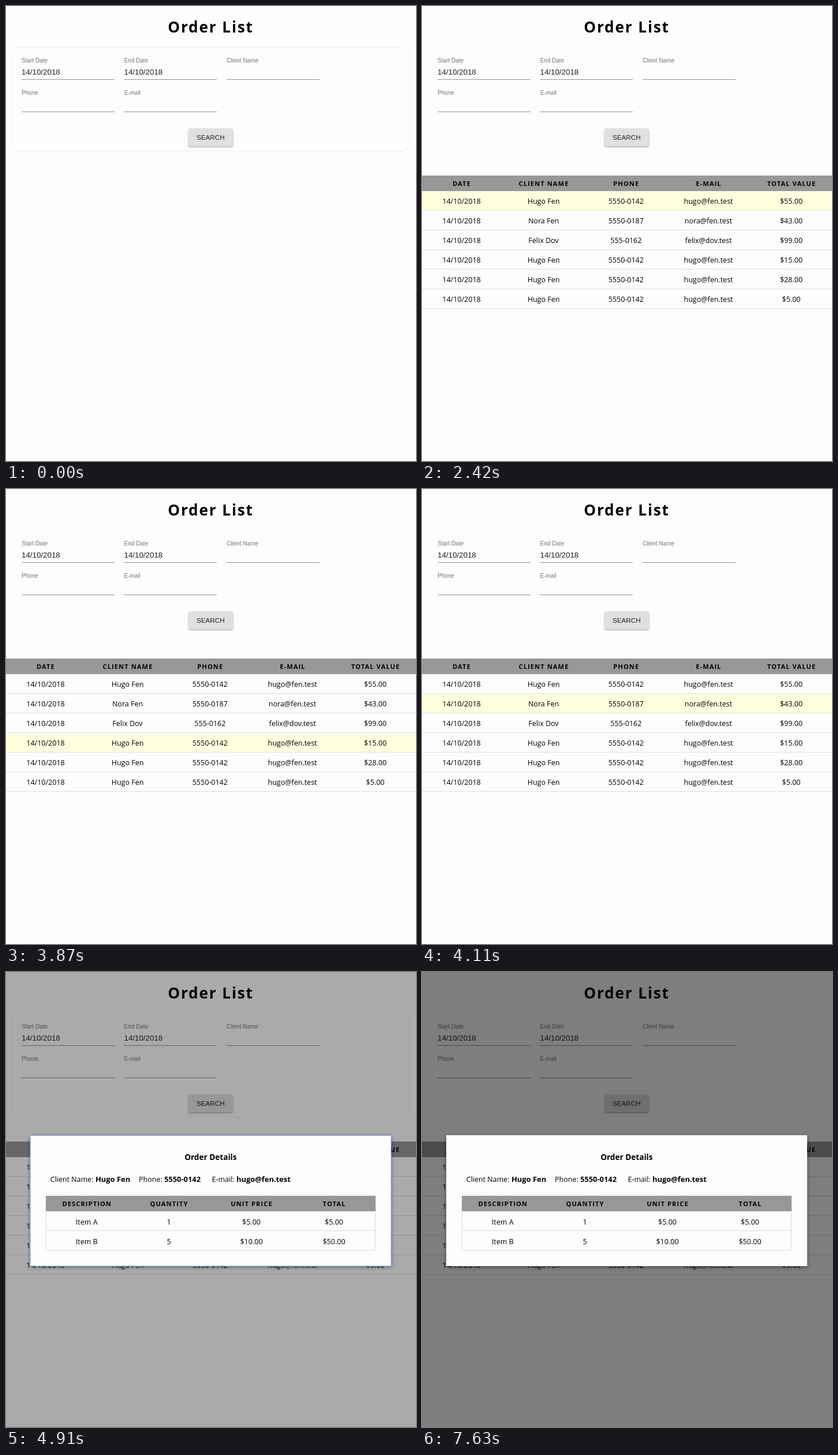
An HTML page for the animation above (7730 ms loop, 710x789 px).

```html
<!DOCTYPE html>
<html lang="en">
<head>
<meta charset="utf-8">
<title>Order List</title>
<style>
  html, body { margin: 0; width: 100%; height: 100%; overflow: hidden; background: #fdfdfd; }
  svg { display: block; width: 100vw; height: 100vh; }
  text { font: 12.5px "Open Sans", "Noto Sans", sans-serif; fill: #000; white-space: pre; }
  .mid { text-anchor: middle; }
  .title { font-size: 26.2px; font-weight: 700; letter-spacing: 1.85px; }
  .th { font-size: 11.1px; font-weight: 700; letter-spacing: 1.1px; }
  .h3 { font-size: 13.6px; font-weight: 700; }
  .strong { font-size: 12.9px; font-weight: 700; }
  .label, .value, .caps { font-family: "Liberation Sans", Arial, sans-serif; }
  .label { font-size: 10px; fill: #757575; }
  .value { font-size: 13.33px; fill: #212121; }
  .caps { font-size: 11.67px; fill: #212121; }
  #modalBox { filter: drop-shadow(0 2px 3px rgba(0, 0, 0, .4)); }
</style>
</head>
<body>
<svg id="stage" viewBox="0 0 710 789" preserveAspectRatio="none">
  <defs>
    <clipPath id="buttonClip"><rect x="316" y="212.5" width="77" height="31" rx="3"/></clipPath>
  </defs>
  <rect width="710" height="789" fill="#fdfdfd"/>
  <g id="form"></g>
  <g id="button">
    <rect id="face" x="316" y="212.5" width="77" height="31" rx="3"/>
    <g clip-path="url(#buttonClip)"><circle id="ripple" cx="347" cy="228"/></g>
  </g>
  <g id="orders"></g>
  <rect id="shade" width="710" height="789"/>
  <g id="modal"></g>
</svg>
<script>
const LOOP = 7730;
const $ = id => document.getElementById(id);

function add(parent, tag, attrs, content) {
  const el = document.createElementNS("http://www.w3.org/2000/svg", tag);
  for (const key in attrs) el.setAttribute(key, attrs[key]);
  if (content) el.textContent = content;
  parent.appendChild(el);
  return el;
}
const rect = (parent, x, y, width, height, fill, more) =>
  add(parent, "rect", { x, y, width, height, fill, ...more });
const text = (parent, x, y, content, cls = "") =>
  add(parent, "text", { x, y, class: cls }, content);

function row(parent, centers, y, cells, header) {
  cells.forEach((cell, i) =>
    text(parent, centers[i] + (header ? .5 : 0), y, cell, header ? "mid th" : "mid"));
}

// Search form
const form = $("form");
const card = rect(form, 9.5, 71.5, 689, 180, "none", { rx: 14, stroke: "#eeeeee" });
text(form, 354.5, 46, "Order List", "mid title");
[
  [27, 98, "Start Date", "14/10/2018"],
  [204.5, 98, "End Date", "14/10/2018"],
  [382, 98, "Client Name", ""],
  [27, 154, "Phone", ""],
  [204.5, 154, "E-mail", ""]
].forEach(([x, y, label, value]) => {
  text(form, x, y - .5, label, "label");
  if (value) text(form, x, y + 21, value, "value");
  rect(form, Math.floor(x), y + 29, 161, 1, "#949494");
});
text($("button"), 354.3, 232, "SEARCH", "mid caps");

// Order table
const people = {
  hugo: ["Hugo Fen", "5550-0142", "hugo@fen.test"],
  nora: ["Nora Fen", "5550-0187", "nora@fen.test"],
  felix: ["Felix Dov", "555-0162", "felix@dov.test"]
};
const sales = [["hugo", 55], ["nora", 43], ["felix", 99], ["hugo", 15], ["hugo", 28], ["hugo", 5]];
const money = n => "$" + n.toFixed(2);
const orders = $("orders");
const columns = [68.5, 210.5, 353.3, 496, 639.5];
rect(orders, 0, 294, 710, 27, "#989898");
row(orders, columns, 312, ["DATE", "CLIENT NAME", "PHONE", "E-MAIL", "TOTAL VALUE"], true);
const hover = rect(orders, 0, 321, 710, 33, "#ffffe0");
sales.forEach(([who, total], i) => {
  const y = 321 + 34 * i;
  rect(orders, 0, y + 33, 710, 1, "#dddddd");
  row(orders, columns, y + 22, ["14/10/2018", ...people[who], money(total)]);
});

// Order details
const modal = $("modal");
const box = rect(modal, 42, 283, 625, 227, "#fdfdfd", { id: "modalBox" });
const outline = rect(modal, 42, 283.5, 625, 226.5, "none", { stroke: "#6f9fe6", rx: 1 });
text(modal, 354.3, 325.5, "Order Details", "mid h3");
const [client, phone, email] = people.hugo;
[[76.5, "Client Name:", 155, client], [230, "Phone:", 274, phone], [356.5, "E-mail:", 399, email]]
  .forEach(([x, label, valueX, value]) => {
    text(modal, x, 363.5, label);
    text(modal, valueX, 363.5, value, "strong");
  });
const parts = [139.7, 282, 425, 568];
rect(modal, 69.5, 388.5, 570, 94.5, "none", { stroke: "#dddddd" });
rect(modal, 69, 388, 571, 27, "#989898");
rect(modal, 69, 448, 571, 1, "#dddddd");
row(modal, parts, 406, ["DESCRIPTION", "QUANTITY", "UNIT PRICE", "TOTAL"], true);
[["Item A", 1, 5], ["Item B", 5, 10]].forEach(([name, count, price], i) =>
  row(modal, parts, 437.5 + 34 * i, [name, String(count), money(price), money(count * price)]));

// Timing: [start, value]; the last step already begun applies
const hoverSteps = [[0, -1], [2420, 0], [2670, 1], [2920, 2], [3110, 3], [3170, 4], [3300, 5],
  [3670, 4], [3870, 3], [3920, 2], [4110, 1], [4360, 0], [4850, -1]];
const shadeSteps = [[0, 0], [4850, .015], [4910, .33], [4970, .46], [5030, .5]];
const stepAt = (steps, t) => steps.filter(([start]) => t >= start).pop()[1];

// cubic-bezier(.4, 0, .2, 1)
function ease(x) {
  let lo = 0, hi = 1, s = .5;
  for (let i = 0; i < 20; i++) {
    s = (lo + hi) / 2;
    const bx = 1.2 * s * (1 - s) ** 2 + .6 * s * s * (1 - s) + s ** 3;
    if (bx < x) lo = s; else hi = s;
  }
  return 3 * s * s * (1 - s) + s ** 3;
}
const progress = (t, start, length) => {
  const x = (t - start) / length;
  return x <= 0 ? 0 : x >= 1 ? 1 : ease(x);
};
const show = (el, on) => el.setAttribute("visibility", on ? "visible" : "hidden");

function draw(t) {
  const open = t >= 4850;
  show(card, t < 1550 || open && t < 5030);
  show(orders, t >= 1550);
  show(modal, open);
  show(outline, open && t < 7630);
  box.setAttribute("fill", t < 4910 ? "#f9f9f9" : "#fdfdfd");

  const index = stepAt(hoverSteps, t);
  hover.setAttribute("y", 321 + 34 * Math.max(index, 0));
  hover.setAttribute("opacity", index < 0 ? 0 : 1);
  $("shade").setAttribute("opacity", stepAt(shadeSteps, t));

  const over = progress(t, 1190, 250) - progress(t, 2180, 240);
  const grey = 224 - 4 * over;
  const press = progress(t, 1350, 150) - progress(t, 1560, 250);
  $("face").setAttribute("fill", `rgb(${grey},${grey},${grey})`);
  $("face").style.filter =
    `drop-shadow(0 ${1 + press}px ${1 + .5 * press}px rgba(0,0,0,${.4 + .05 * press}))`;

  const grow = progress(t, 1340, 550);
  $("ripple").setAttribute("r", 50 * grow);
  $("ripple").setAttribute("opacity", (.1 + .2 * grow) * .87 * 1.1 * (1 - progress(t, 1550, 400)));
}

function tick() {
  draw(performance.now() % LOOP);
  requestAnimationFrame(tick);
}
tick();
</script>
</body>
</html>
```
